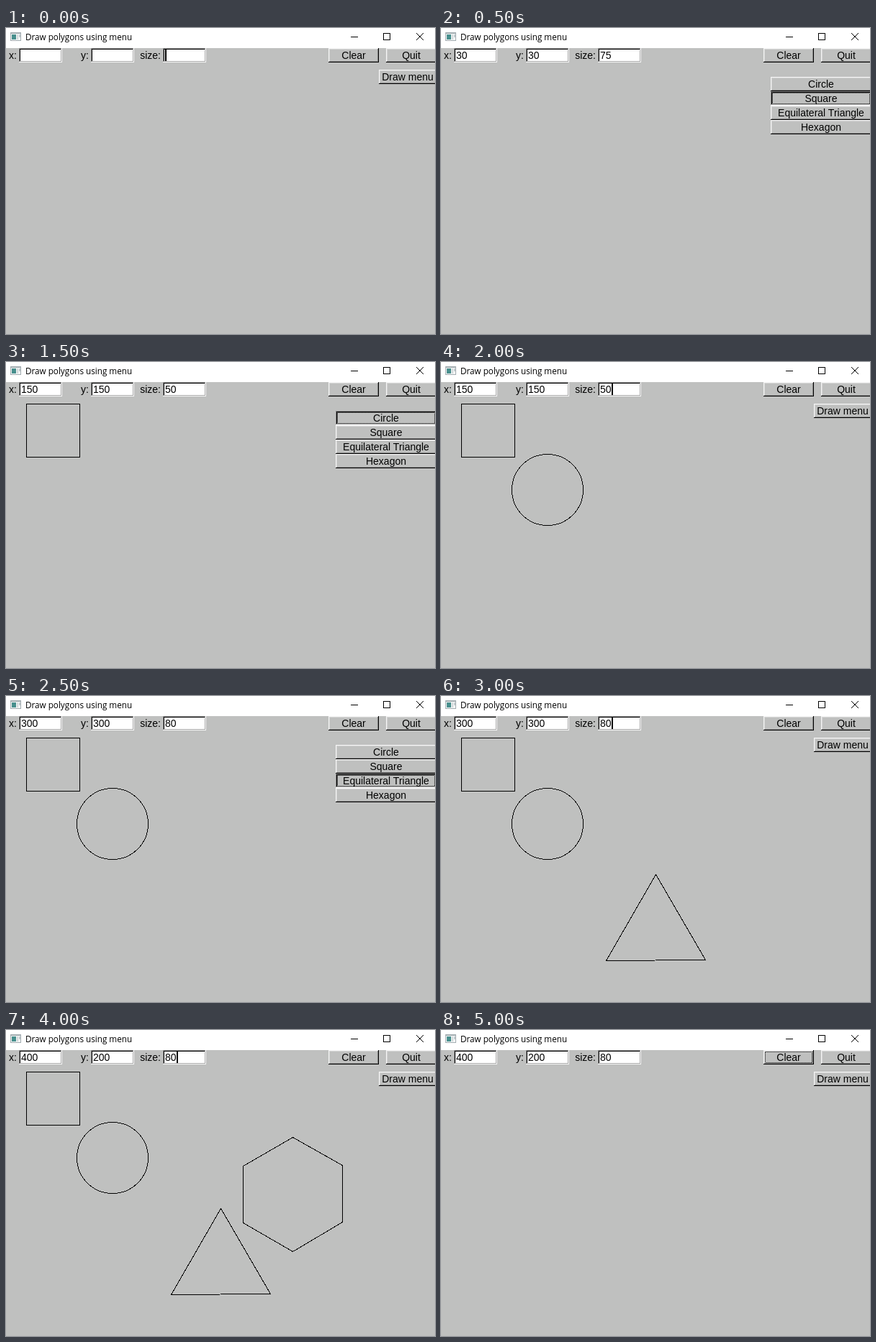
An HTML page for the animation above (5.5 s loop, 596 by 426 pixels).

```html
<!DOCTYPE html>
<html lang="en">
<head>
<meta charset="utf-8">
<title>Draw polygons using menu</title>
<style>
  html, body { margin: 0; width: 100%; height: 100%; overflow: hidden; background: #bfc0bf; }
  svg { display: block; }
  text { font: 14px "Liberation Sans", Arial, sans-serif; white-space: pre; }
  .title { font: 11.7px "Open Sans", "Noto Sans", sans-serif; }
  .line { fill: none; stroke: #000; shape-rendering: crispEdges; }
  .focus { fill: none; stroke: #000; stroke-dasharray: 1; stroke-dashoffset: -0.5; }
</style>
</head>
<body>
<svg id="stage" width="596" height="426" viewBox="0 0 596 426"></svg>
<script>
const STEP = 500;
const FACE = '#bfc0bf';
// Bevel colours: outer bottom-right, outer top-left, inner bottom-right, inner top-left.
const RAISED = ['#000', '#f5f5f5', '#8a8a8a', '#d5d5d5'];
const SUNKEN = ['#f5f5f5', '#8a8a8a', '#ababab', '#000'];
const MENU = ['Circle', 'Square', 'Equilateral Triangle', 'Hexagon'];

// Each drawing round: field values, chosen menu item, resulting shape.
const ROUNDS = [
  { values: [30, 30, 75], item: 1, shape: polygon([28, 58], [102, 58], [102, 132], [28, 132]) },
  { values: [150, 150, 50], item: 0, shape: '<circle class="line" cx="148" cy="178" r="49.5"/>' },
  { values: [300, 300, 80], item: 2, shape: polygon([298, 248], [367, 367], [229, 368]) },
  { values: [400, 200, 80], item: 3,
    shape: polygon([398, 149], [467, 188], [467, 267], [398, 308], [329, 268], [329, 189]) },
];

function polygon(...points) {
  const list = points.map(([x, y]) => `${x + 0.5},${y + 0.5}`).join(' ');
  return `<polygon class="line" points="${list}"/>`;
}

function rect(x, y, w, h, fill) {
  return `<rect x="${x}" y="${y}" width="${w}" height="${h}" fill="${fill}"/>`;
}

function label(x, y, text, anchor = 'start', cls = '') {
  return `<text x="${x}" y="${y}" text-anchor="${anchor}" class="${cls}">${text}</text>`;
}

function box(x, y, w, h, [outerLow, outerHigh, innerLow, innerHigh], fill) {
  return rect(x, y, w, h, outerLow)
    + rect(x, y, w - 1, h - 1, outerHigh)
    + rect(x + 1, y + 1, w - 2, h - 2, innerLow)
    + rect(x + 1, y + 1, w - 3, h - 3, innerHigh)
    + rect(x + 2, y + 2, w - 4, h - 4, fill);
}

function button(x, y, w, text, { pressed = false, focused = pressed } = {}) {
  const ring = `<rect class="focus" x="${x + 2.5}" y="${y + 2.5}" width="${w - 5}" height="15"/>`;
  return box(x, y, w, 20, pressed ? SUNKEN : RAISED, FACE)
    + label(x + w / 2, y + 15, text, 'middle')
    + (focused ? ring : '');
}

function field(x, name, value, caret) {
  const text = String(value);
  return label(x - 3, 43, name, 'end')
    + box(x, 28, 60, 20, SUNKEN, '#fff')
    + label(x + 3, 43, text)
    + (caret ? rect(x + 3 + 8 * text.length, 30, 2, 16, '#000') : '');
}

function titleBar() {
  return rect(0, 0, 596, 28, '#fff')
    + rect(6, 6, 15, 12, '#a3adb1') + rect(7, 8, 13, 9, '#f4f6f6')
    + rect(8, 9, 6, 7, '#478f8d') + rect(15, 9, 2, 7, '#d3d9db') + rect(18, 9, 2, 4, '#c2cbcf')
    + label(27, 17, 'Draw polygons using menu', 'start', 'title')
    + '<path class="line" d="M479 12.5h10M524.5 7.5h9v9h-9z"/>'
    + '<path d="M570 7l10 10M580 7l-10 10" stroke="#000" fill="none"/>';
}

function stateAt(step) {
  if (step > 8) return { values: ROUNDS[3].values, drawn: step < 10 ? 4 : 0, clear: { pressed: step < 10, focused: true } };
  const drawn = step >> 1;
  const choosing = step % 2 === 1;
  if (choosing) return { values: ROUNDS[drawn].values, drawn, item: ROUNDS[drawn].item };
  return { values: drawn ? ROUNDS[drawn - 1].values : ['', '', ''], drawn, caret: true };
}

function scene({ values, drawn, item, caret, clear }) {
  const menu = item === undefined
    ? button(518, 58, 80, 'Draw menu')
    : MENU.map((text, i) => button(458, 68 + 20 * i, 140, text, { pressed: i === item })).join('');
  return rect(0, 28, 596, 398, FACE) + titleBar()
    + field(18, 'x:', values[0])
    + field(118, 'y:', values[1])
    + field(218, 'size:', values[2], caret)
    + button(448, 28, 70, 'Clear', clear)
    + button(528, 28, 70, 'Quit')
    + menu
    + ROUNDS.slice(0, drawn).map(round => round.shape).join('');
}

const stage = document.getElementById('stage');
const start = performance.now();
let shown = -1;

function render() {
  const step = Math.floor((performance.now() - start) / STEP) % 11;
  if (step !== shown) {
    stage.innerHTML = scene(stateAt(step));
    shown = step;
  }
  requestAnimationFrame(render);
}
render();
</script>
</body>
</html>
```
